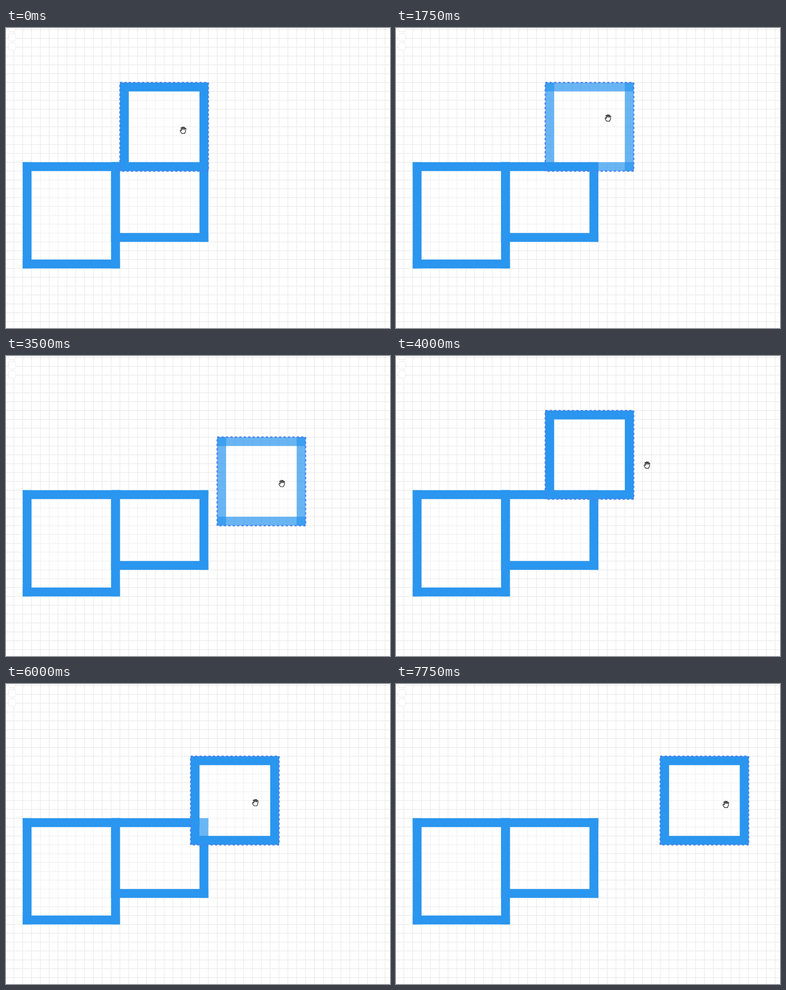
Animation of 847 by 661 pixels, one loop 8000 ms. Source, as an HTML page:

```html
<!DOCTYPE html>
<html lang="en">
<head>
<meta charset="utf-8">
<title>Room planner</title>
<style>
  html, body { margin: 0; width: 100%; height: 100%; overflow: hidden; background: #fff; }
  svg { display: block; width: 847px; height: 661px; }
  .wall { fill: #2a96ef; }
  .floor { fill: #fff; fill-opacity: .3; }
  .ghost .wall { fill-opacity: .7; }
  .frame { fill: none; stroke: #4a80ee; stroke-width: 2.9; stroke-dasharray: 4.875; }
  .bad .frame { stroke: #f5504e; }
  .button { fill: #fff; stroke: #e9e9e9; }
  .grid { stroke: #ebebeb; stroke-width: 1.4; }
  .hand { fill: #fff; stroke: #000; stroke-width: 1.15; stroke-linejoin: round; }
  .halo { fill: none; stroke: #fff; stroke-width: 2.6; stroke-linejoin: round; }
</style>
</head>
<body>
<svg viewBox="0 0 847 661">
  <g id="grid" class="grid"></g>
  <g id="buttons"></g>
  <g id="rooms"></g>
  <g id="drag"></g>
  <g id="cursor"></g>
</svg>
<script>
const CELL = 19.5, X0 = 17.3, Y0 = 3.2, STEP = 250, COUNT = 32;
const byId = id => document.getElementById(id);
const px = col => X0 + col * CELL;
const py = row => Y0 + row * CELL;

function add(parent, tag, attrs) {
  const el = document.createElementNS('http://www.w3.org/2000/svg', tag);
  for (const key in attrs) el.setAttribute(key, attrs[key]);
  return parent.appendChild(el);
}

function rect(parent, cls, x, y, width, height, rx = 0) {
  return add(parent, 'rect', { class: cls, x, y, width, height, rx });
}

// Four overlapping walls, one cell thick, around a floor.
function room(parent, x, y, cols, rows) {
  const w = cols * CELL, h = rows * CELL;
  rect(parent, 'floor', x + CELL, y + CELL, w - 2 * CELL, h - 2 * CELL);
  rect(parent, 'wall', x, y, w, CELL);
  rect(parent, 'wall', x, y + h - CELL, w, CELL);
  rect(parent, 'wall', x, y, CELL, h);
  rect(parent, 'wall', x + w - CELL, y, CELL, h);
}

for (let x = X0; x < 847; x += CELL) add(byId('grid'), 'path', { d: `M${x} 0V661` });
for (let y = Y0; y < 661; y += CELL) add(byId('grid'), 'path', { d: `M0 ${y}H847` });
for (const y of [-8.5, 12.5, 32.5]) rect(byId('buttons'), 'button', 5.5, y, 16, 16, 4);

room(byId('rooms'), px(1), py(15), 11, 12);
room(byId('rooms'), px(11), py(15), 11, 9);

const drag = byId('drag');
room(drag, 0, 0, 10, 10);
rect(drag, 'frame', 0, 0, 10 * CELL, 10 * CELL);

const hand = 'M-3.4 7.3C-3.9 5.9-5.4 4.5-6.4 2.5C-7.4.8-6.4-.7-5 0L-3.6 1.3C-3.8-1-4.6-2.8-5-4.2' +
  'C-5.3-5.8-3.6-6.3-3-4.8L-1.8-1.2L-2-5.8C-2-7.6-.2-7.6 0-5.9L.4-1.3L1.2-5.8C1.6-7.3 3.2-6.9 3-5.4' +
  'L2.6-1L4-3.6C4.7-5 6.3-4.3 5.9-2.8C5.3-.5 5.5 2 4.6 4C4 5.5 3.3 6.1 3.3 7.3Z';
const cursor = byId('cursor');
add(cursor, 'path', { class: 'halo', d: hand });
add(cursor, 'path', { class: 'hand', d: hand });

const SOLID = '', GHOST = 'ghost', BAD = 'ghost bad';
// step, column, row, look, pointer (when it is away from the grab point)
const moves = [
  [0, 12, 6, SOLID, 391, 225],
  [1, 14, 6, GHOST],
  [2, 16, 7, BAD],
  [3, 16, 5, GHOST],
  [4, 16, 4, GHOST, 477, 179],
  [5, 16, 4, GHOST, 474, 174],
  [6, 16, 5, GHOST, 471, 190],
  [7, 16, 6, GHOST, 468, 198],
  [8, 16, 6, GHOST, 466, 202],
  [9, 16, 7, BAD, 465, 212],
  [10, 16, 7, BAD, 465, 208],
  [11, 17, 7, BAD],
  [12, 21, 8, GHOST],
  [13, 25, 9, GHOST],
  [14, 23, 9, GHOST],
  [15, 20, 9, BAD],
  [16, 16, 6, SOLID, 554, 240],
  [17, 18, 4, GHOST],
  [18, 18, 3, GHOST],
  [19, 18, 3, SOLID, 490, 160],
  [20, 18, 3, SOLID, 420, 155],
  [21, 18, 3, SOLID, 357, 150],
  [22, 18, 3, SOLID, 449, 143],
  [23, 19, 5, GHOST],
  [24, 20, 8, SOLID],
  [27, 21, 12, SOLID, 487, 113],
  [28, 23, 11, GHOST],
  [29, 25, 10, GHOST],
  [30, 27, 9, GHOST],
  [31, 29, 8, SOLID, 728, 265]
];

function draw(time) {
  const step = Math.floor(time / STEP) % COUNT;
  const [, col, row, look, cx = px(col) + 143, cy = py(row) + 102] =
    moves.filter(move => move[0] <= step).pop();
  drag.setAttribute('class', look);
  drag.setAttribute('transform', `translate(${px(col)} ${py(row)})`);
  cursor.setAttribute('transform', `translate(${cx} ${cy})`);
}

const start = performance.now();
function tick() {
  draw(performance.now() - start);
  requestAnimationFrame(tick);
}
tick();
</script>
</body>
</html>
```
